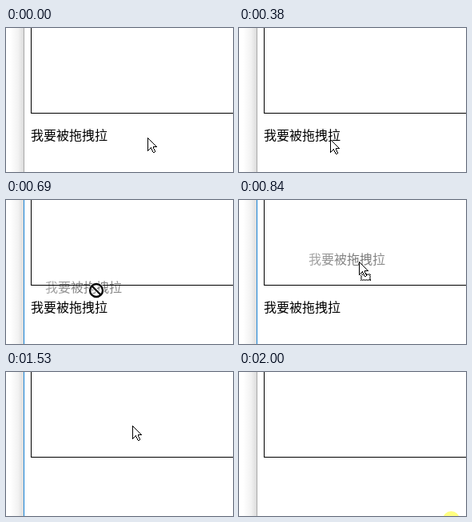
Animation, 284 px wide and 180 px high, one loop 2.15 s. Source, as an HTML page:

```html
<!DOCTYPE html>
<html lang="zh-CN">
<head>
<meta charset="utf-8">
<style>
  html, body { margin: 0; width: 100%; height: 100%; overflow: hidden; background: #fff; }
  svg { display: block; width: 284px; height: 180px; }
  text { font: 300 16px "Noto Sans CJK SC", "Noto Sans CJK", sans-serif; }
  .crisp { shape-rendering: crispEdges; }
</style>
</head>
<body>
<svg viewBox="0 0 284 180">
  <defs>
    <linearGradient id="shade">
      <stop stop-color="#fff"/>
      <stop offset=".6" stop-color="#f2f2f2"/>
      <stop offset="1" stop-color="#dcdcdc"/>
    </linearGradient>
    <radialGradient id="fade" gradientUnits="userSpaceOnUse" cx="94" cy="137" r="75">
      <stop stop-opacity=".55"/>
      <stop offset="1" stop-opacity=".3"/>
    </radialGradient>
    <path id="ban" d="M-4.5 -4.5L6.5 6.5M9 1A8 8 0 1 1 -7 1A8 8 0 1 1 9 1"/>
  </defs>
  <rect x="5" width="17" height="180" fill="url(#shade)"/>
  <rect id="edge" class="crisp" x="22" width="1" height="180"/>
  <path class="crisp" d="M31.5 0V106.5H284" fill="none" stroke="#000"/>
  <text id="label" x="31" y="140">我要被拖拽拉</text>
  <text id="ghost" x="31" y="140" fill="url(#fade)">我要被拖拽拉</text>
  <circle id="click" r="10.5" fill="#ffff80"/>
  <g id="pointer">
    <g id="copy" class="crisp" fill="#fff" stroke="#000" stroke-dasharray="1">
      <rect x="2.5" y="15.5" width="12" height="8"/>
      <rect x="3.5" y="16.5" width="10" height="6"/>
    </g>
    <path id="arrow" class="crisp" d="M.5 .5V16.5L4.5 12.5 6.5 17.5 7.5 18.5H8.5L9.5 17.5 7.5 12.5V11.5H11.5Z" fill="#fff" stroke="#000"/>
    <g id="denied" fill="none">
      <use href="#ban" stroke="#fff" stroke-width="4"/>
      <use href="#ban" stroke="#000" stroke-width="2.3"/>
    </g>
  </g>
</svg>
<script>
const LOOP = 2150, STEP = 230 / 3;
const PRESS = 610, DRAG = 687, DROP = 1530, CLICK = 1990;
const GRAB = [94, 137], BOX_BOTTOM = 106;

// Turning points of the pointer: time, x, y
const path = [
  [0, 177, 137], [73, 177, 137], [380, 114, 139], [530, ...GRAB], [PRESS, ...GRAB],
  [DRAG, 112, 112], [840, 150, 77], [993, 157, 68], [1453, 157, 68],
  [DROP, 158, 67], [CLICK, 265, 184], [LOOP, 265, 184]
];

const $ = id => document.getElementById(id);
const show = (id, on) => $(id).setAttribute('display', on ? 'inline' : 'none');
const move = (id, x, y) => $(id).setAttribute('transform', `translate(${x} ${y})`);
const ease = k => k * k * (3 - 2 * k);

// The picture refreshes in even steps, counted from 150 ms.
const snap = t => Math.max(0, Math.round(150 + Math.floor((t - 149.5) / STEP) * STEP));

function pointerAt(t) {
  const i = path.findIndex(key => key[0] > t);
  const [t0, x0, y0] = path[i - 1], [t1, x1, y1] = path[i];
  const k = ease((t - t0) / (t1 - t0));
  return [Math.round(x0 + (x1 - x0) * k), Math.round(y0 + (y1 - y0) * k)];
}

function draw(now) {
  const t = snap(now % LOOP);
  const [x, y] = pointerAt(t);
  const dragging = t >= DRAG && t < DROP;
  const inBox = y < BOX_BOTTOM;

  $('edge').setAttribute('fill', t >= PRESS && t < CLICK ? '#1883d7' : '#a9a9a9');
  show('label', t < DROP);
  show('ghost', dragging);
  move('ghost', x - GRAB[0], y - GRAB[1]);
  move('pointer', x, y);
  show('arrow', !dragging || inBox);
  show('copy', dragging && inBox);
  show('denied', dragging && !inBox);
  show('click', t >= CLICK);
  move('click', x + .5, y + .5);
  requestAnimationFrame(draw);
}
draw(performance.now());
</script>
</body>
</html>
```
